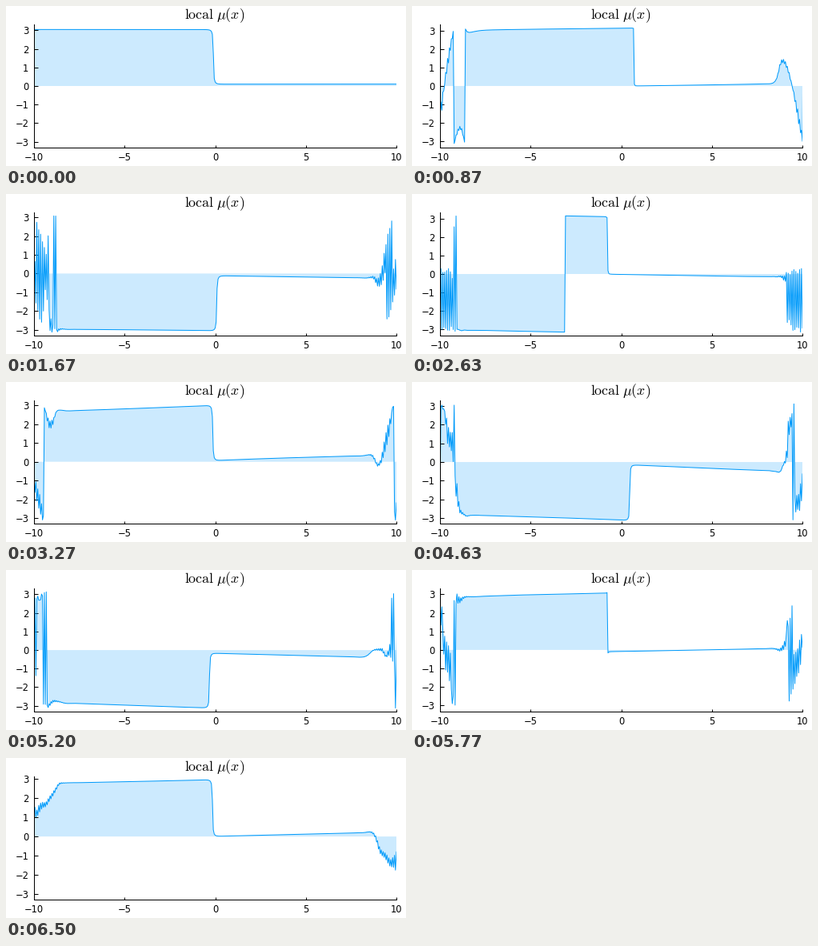
Recreate the animation shown at these times as a matplotlib script. Size 500 px wide and 200 px high, loop 6530 ms.

```python
"""Phase of a dark soliton oscillating in a harmonically trapped superfluid."""
import numpy as np
import matplotlib.pyplot as plt
from matplotlib.animation import FuncAnimation
from matplotlib.patches import Polygon

FRAMES, LOOP_MS = 196, 6530
W, H = 500, 200
BLUE = "#009afa"

# Grid, trap and interaction
L, N = 40.0, 768
MU, G = 25.0, 0.1
dx = L / N
x = (np.arange(N) - N // 2 + 1) * dx
k = 2 * np.pi * np.fft.fftfreq(N, dx)
kinetic = k**2 / 2
trap = x**2 / 2 - MU


def evolve(psi, time, steps, gamma=0.0):
    """Split-step Gross-Pitaevskii evolution, optionally damped."""
    rate = -(1j + gamma) * time / steps
    drift = np.exp(rate * kinetic)

    def kick(p):
        return p * np.exp(rate / 2 * (trap + G * (p.real**2 + p.imag**2)))

    for _ in range(steps):
        psi = kick(np.fft.ifft(drift * np.fft.fft(kick(psi))))
    return psi


def trajectory(psi, dt):
    """Phase profile of every frame, with grid-scale noise in the faint tails."""
    rng = np.random.default_rng(4)
    ripple = np.interp(9.2, x, np.abs(psi)) * (-1.0)**np.arange(N)
    for i in range(FRAMES):
        level = 1 - np.exp(-i / 10)
        noise = level * ripple * np.exp(1j * rng.uniform(-np.pi, np.pi))
        yield np.angle(psi + noise)
        psi = evolve(psi, dt, 60)


# Relax the Thomas-Fermi profile, then imprint a slow soliton
thomas_fermi = np.sqrt(np.maximum(-trap, 0) / G).astype(complex)
ground = evolve(thomas_fermi, 4.0, 2700, gamma=0.5)
speed, start = 0.1, -0.1
depth = np.sqrt(1 - speed**2)
soliton = ground * (depth * np.tanh(depth * (x - start) * np.sqrt(MU)) + 1j * speed)
phases = list(trajectory(soliton, 8 * np.pi / np.sqrt(2) / 199))

plt.rcParams.update({"font.family": "DejaVu Sans", "mathtext.fontset": "cm"})
fig = plt.figure(figsize=(W / 100, H / 100), dpi=100, facecolor="white")
ax = fig.add_axes([35 / W, 23 / H, 453 / W, 154 / H])
px = 0.72  # points per pixel
ax.spines[["top", "right"]].set_visible(False)
ax.spines[["left", "bottom"]].set_linewidth(px)
ax.tick_params(direction="in", width=px, labelsize=8.3)
ax.tick_params(axis="x", length=3 * px, pad=6.2 * px)
ax.tick_params(axis="y", length=5 * px, pad=6.5 * px)
ax.set_xlim(-10, 10)
ax.set_xticks(range(-10, 11, 5))
ax.set_yticks(range(-3, 4))
fig.text(261 / W, 184 / H, r"$\mathrm{local}\;\mu(x)$", fontsize=12.9,
         ha="center", va="baseline")

view = np.abs(x) < 10.5
xv = x[view]
area = Polygon([[0, 0], [1, 0], [1, 1]], closed=True, fc=BLUE, ec="none",
               alpha=0.2, zorder=1)
ax.add_patch(area)
line, = ax.plot([], [], color=BLUE, lw=px, zorder=2)


def draw(i):
    theta = phases[i]
    y = theta[view]
    line.set_data(xv, y)
    area.set_xy(np.column_stack([np.r_[xv[0], xv, xv[-1]], np.r_[0, y, 0]]))
    lo, hi = theta.min(), theta.max()
    pad = 0.03 * (hi - lo)
    ax.set_ylim(lo - pad, hi + pad)
    return line, area


anim = FuncAnimation(fig, draw, frames=FRAMES, interval=LOOP_MS / FRAMES,
                     init_func=lambda: draw(0), repeat=True, repeat_delay=0)
plt.show()
```
